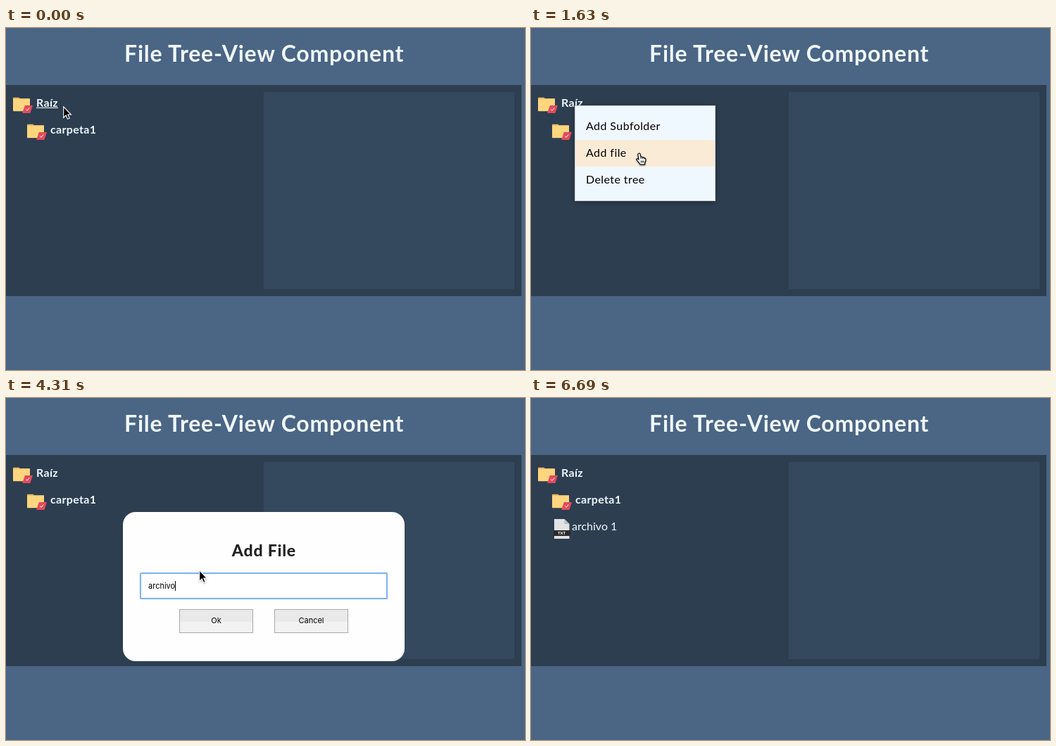
Recreate the animation shown at these times as an HTML page. Size 737 px wide and 486 px high, loop 8.03 s.

```html
<!DOCTYPE html>
<html lang="en">
<head>
<meta charset="utf-8">
<title>File Tree-View Component</title>
<style>
  html, body { margin: 0; width: 100%; height: 100%; overflow: hidden; background: #4b6584; }
  svg { display: block; width: 737px; height: 486px; }
  text { font-family: Lato, "Open Sans", sans-serif; font-size: 16px; white-space: pre; }
  .title { font-size: 32px; font-weight: 700; letter-spacing: .8px; fill: #f0f8ff; text-anchor: middle; }
  .label { fill: #f0f8ff; letter-spacing: 0; }
  .folder .label { font-weight: 700; letter-spacing: .32px; }
  .item { letter-spacing: .42px; fill: #000; }
  .heading { font-size: 23px; font-weight: 800; letter-spacing: .8px; fill: #222; text-anchor: middle; }
  .ui text { font-family: Inter, "Noto Sans", sans-serif; font-size: 11px; fill: #000; }
  .ui .center { text-anchor: middle; }
</style>
</head>
<body>
<svg viewBox="0 0 737 486" xmlns="http://www.w3.org/2000/svg">
  <defs>
    <filter id="menuShadow" x="-10%" y="-10%" width="120%" height="125%">
      <feDropShadow dx="0" dy="2" stdDeviation="5" flood-color="#000" flood-opacity=".3"/>
    </filter>
    <filter id="cursorShadow" x="-40%" y="-30%" width="180%" height="170%">
      <feDropShadow dx="0" dy="1" stdDeviation=".8" flood-color="#000" flood-opacity=".35"/>
    </filter>
    <g id="folderIcon">
      <path d="M0 1.6Q0 .8 .8 .8H8.4L10 2.2H23.2Q24 2.2 24 3V8H0Z" fill="#e6bb6a"/>
      <path d="M0 3H8.6L10.2 2.6H23.4Q24 2.6 24 3.4V19.4Q24 20.2 23.2 20.2H.8Q0 20.2 0 19.4Z" fill="#ffd57e"/>
      <path d="M16.8 12H28L24.4 23H13.2Z" fill="#e24b5c"/>
      <path d="M18.3 17.7L20 19.3L23.2 15.5" fill="none" stroke="#fff" stroke-width="1"/>
    </g>
  </defs>

  <rect width="737" height="486" fill="#4b6584"/>
  <text class="title" x="366.7" y="47.5">File Tree-View Component</text>
  <rect y="81" width="732" height="300" fill="#2d3e50"/>
  <rect x="366" y="91" width="356" height="280" fill="#34495e"/>

  <g class="folder">
    <use href="#folderIcon" x="10" y="98"/>
    <text class="label" x="43" y="112">Raíz</text>
    <rect id="underline" x="43" y="113" width="31" height="1" fill="#f0f8ff"/>
    <use href="#folderIcon" x="30" y="136"/>
    <text class="label" x="63" y="150">carpeta1</text>
  </g>

  <g id="file">
    <path d="M33 172H47.5L54.5 179V200H33Z" fill="#e2e3e5"/>
    <path d="M47.5 172L54.5 179H47.5Z" fill="#b9bdc1"/>
    <rect x="32" y="188" width="24" height="8" fill="#2b2b2b"/>
    <text x="43.5" y="194.3" text-anchor="middle" style="font-size:6px;font-weight:700" fill="#fff">TXT</text>
    <text class="label" x="58" y="188">archivo 1</text>
  </g>

  <g id="menu">
    <rect x="62.5" y="110.5" width="199" height="135" fill="#f0f8ff" stroke="#c6ccd2" filter="url(#menuShadow)"/>
    <rect id="highlight" x="63" width="198" height="38" fill="#faebd7"/>
    <text class="item" x="78" y="145">Add Subfolder</text>
    <text class="item" x="78" y="183">Add file</text>
    <text class="item" x="78" y="221">Delete tree</text>
  </g>

  <g id="modal">
    <rect x="166" y="162" width="400" height="212" rx="18" fill="#fefefe"/>
    <text class="heading" x="366.4" y="225">Add File</text>
    <g class="ui">
      <rect x="191.5" y="249.5" width="349" height="35" fill="#fff" stroke="#c8c8c8"/>
      <g id="ring" fill="none">
        <rect x="190.5" y="248.5" width="351" height="37" rx="1.5" stroke="#8fbff5" stroke-width="1.5"/>
        <rect x="191.5" y="249.5" width="349" height="35" stroke="#75adef"/>
      </g>
      <text id="value" x="202" y="271"></text>
      <rect id="caret" y="260" width="1" height="14" fill="#000"/>
      <g id="ok"></g>
      <g id="cancel"></g>
    </g>
  </g>

  <g id="cursor" filter="url(#cursorShadow)">
    <path id="arrow" d="M.7 .8V16.4L4.2 13L6.6 18.4L9.1 17.3L6.8 12H11.4Z" fill="#000" stroke="#fff" stroke-width="1.1"/>
    <g id="hand" transform="translate(-4 .5)" stroke="#000" stroke-linejoin="round">
      <path fill="#fff" stroke-width="1.2" d="M4 .8C5.3 .3 6 1 6.2 2L7 6C7.6 5.2 9 5.4 9.4 6.4C10.3 5.8 11.4 6.2 11.7 7.2C12.8 6.9 13.8 7.6 13.9 8.8C14.2 11.5 13.4 13 12.7 14.5V16.6H6C5.5 14.5 2.6 12.3 1 10C.2 8.6 1.6 7.6 3 8.6L4 9.5L2.8 2.6C2.7 1.6 3 1 4 .8Z"/>
      <path fill="none" stroke-width=".9" d="M7 6L7.4 8.5M9.4 6.4L9.7 8.7M11.7 7.2L11.9 9M7.3 11V14M9.2 11V14M11 11V14"/>
    </g>
    <path id="beam" d="M-3 -8Q0 -8 0 -6V6Q0 8 -3 8M3 -8Q0 -8 0 -6V6Q0 8 3 8" fill="none" stroke="#111" stroke-width="1.1"/>
  </g>
</svg>

<script>
const LOOP = 8030;
const MENU_OPEN = 590, MODAL_OPEN = 1780, FOCUS = 2670, PRESS = 5940, MODAL_CLOSE = 6090, CURSOR_GONE = 6690;

// Pointer stops: time, x, y. The pointer jumps from one to the next.
const pointer = [
  [0, 81, 111], [150, 76, 111], [300, 68, 110], [440, 62, 110],
  [740, 66, 114], [890, 79, 124], [1040, 99, 138], [1190, 120, 151],
  [1340, 138, 164], [1490, 149, 173], [1630, 153, 177], [1780, 153, 176],
  [2080, 166, 190], [2230, 198, 222], [2380, 227, 251], [2520, 240, 264],
  [2820, 274, 244], [5350, 280, 253], [5500, 299, 277], [5650, 315, 298],
  [5790, 321, 305], [6390, 352, 326], [6540, 433, 374]
];
const typing = [
  [0, ""], [3570, "a"], [3720, "ar"], [3870, "arc"], [4020, "arch"],
  [4160, "archiv"], [4310, "archivo"], [4600, "archivo "], [4750, "archivo 1"]
];
const caretStates = [[0, false], [FOCUS, true], [3120, false], [3570, true], [4900, false], [5350, true], [5500, false]];

const el = {};
document.querySelectorAll("[id]").forEach(node => el[node.id] = node);

const show = (node, on) => node.setAttribute("display", on ? "inline" : "none");
const within = (t, from, to) => t >= from && t < to;
const latest = (steps, t) => steps.findLast(step => step[0] <= t);

function buildButton(node, x, label) {
  node.innerHTML = `<rect x="${x}" y="300" width="105" height="34" fill="#f2f2f2"/>
    <rect x="${x}" y="300" width="105" height="18" fill="#e9e9e9"/>
    <rect x="${x + .5}" y="300.5" width="104" height="33" fill="none" stroke="#a9a9a9"/>
    <text class="center" x="${x + 52.5}" y="320">${label}</text>`;
}

function shadeButton(node, pressed) {
  const [lower, upper] = node.children;
  lower.setAttribute("fill", pressed ? "#bfbfbf" : "#f2f2f2");
  upper.setAttribute("fill", pressed ? "#b1b1b1" : "#e9e9e9");
}

function render(t) {
  const [, x, y] = latest(pointer, t);
  const menuOpen = within(t, MENU_OPEN, MODAL_OPEN);
  const modalOpen = within(t, MODAL_OPEN, MODAL_CLOSE);
  const row = menuOpen ? Math.floor((y - 121) / 38) : -1;
  const overItem = row >= 0 && row < 3;
  const overInput = modalOpen && within(x, 191, 541) && within(y, 249, 285);

  show(el.underline, t < 740);
  show(el.file, t >= MODAL_CLOSE);
  show(el.menu, menuOpen);
  show(el.highlight, overItem);
  el.highlight.setAttribute("y", 121 + 38 * Math.max(row, 0));

  show(el.modal, modalOpen);
  if (modalOpen) {
    const text = latest(typing, t)[1];
    el.value.textContent = text || "Name...";
    el.value.style.fill = text ? "#000" : "#757575";
    const advance = text ? el.value.getComputedTextLength() : 0;
    el.caret.setAttribute("x", Math.round(202 + advance));
    show(el.caret, latest(caretStates, t)[1]);
    show(el.ring, within(t, FOCUS, PRESS));
    shadeButton(el.ok, t >= PRESS);
  }

  show(el.cursor, t < CURSOR_GONE);
  el.cursor.setAttribute("transform", `translate(${x} ${y})`);
  show(el.hand, overItem);
  show(el.beam, overInput);
  show(el.arrow, !overItem && !overInput);
}

function tick() {
  render(performance.now() % LOOP);
  requestAnimationFrame(tick);
}

buildButton(el.ok, 246, "Ok");
buildButton(el.cancel, 381, "Cancel");
tick();
</script>
</body>
</html>
```
